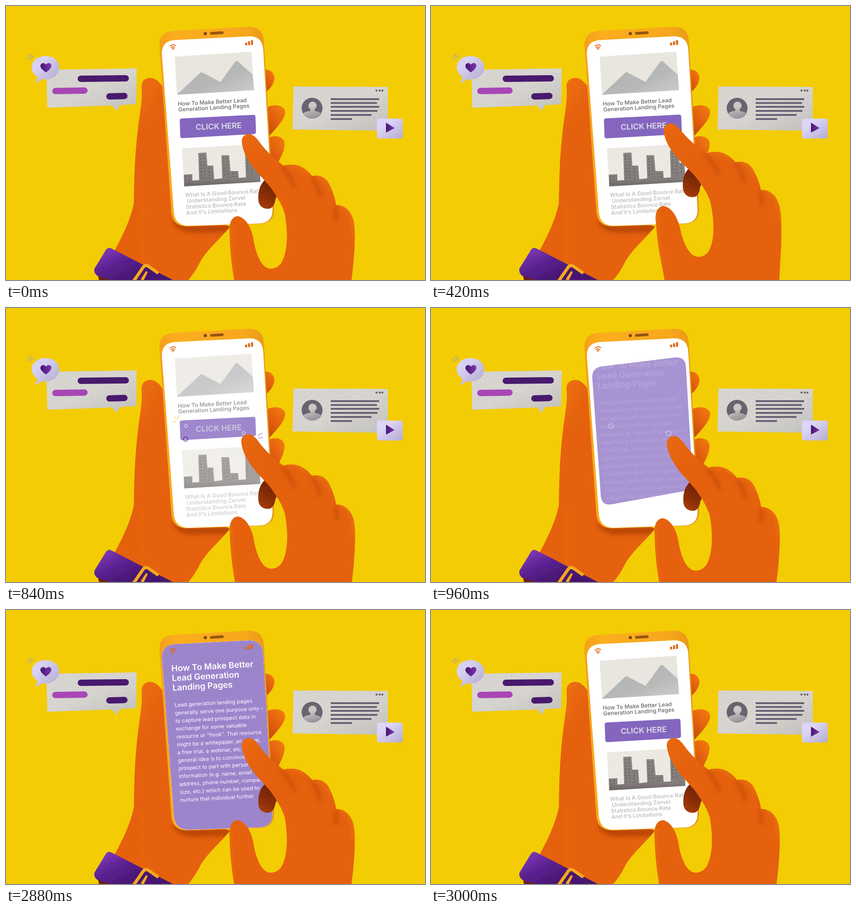
Animation, 924 px wide and 606 px high, one loop 5.37 s. Source, as an HTML page:

```html
<!DOCTYPE html>
<html lang="en">
<head>
<meta charset="utf-8">
<style>
html, body { margin: 0; width: 100%; height: 100%; overflow: hidden; background: #f3cc04; }
svg { display: block; width: 924px; height: 606px; }
text { font-family: Inter, Roboto, sans-serif; font-weight: 600; white-space: pre; }
.bar { fill: none; stroke: #48196d; stroke-width: 14; stroke-linecap: round; }
.ring { fill: none; stroke: #e9e2f8; stroke-width: 1.3; }
</style>
</head>
<body>
<svg viewBox="0 0 924 606">
<defs>
  <linearGradient id="skin" gradientUnits="userSpaceOnUse" x1="290" y1="180" x2="420" y2="260">
    <stop stop-color="#ec6f10"/><stop offset=".4" stop-color="#e5610e"/>
  </linearGradient>
  <linearGradient id="tip" x1="1" y1="0" x2=".3" y2="1">
    <stop stop-color="#f1800f"/><stop offset=".5" stop-color="#e5620e"/><stop offset="1" stop-color="#c34a08"/>
  </linearGradient>
  <linearGradient id="front" gradientUnits="userSpaceOnUse" x1="500" y1="300" x2="770" y2="520">
    <stop stop-color="#ea6a10"/><stop offset=".2" stop-color="#e5610e"/>
  </linearGradient>
  <linearGradient id="curled" x1=".6" y1="0" x2=".2" y2="1">
    <stop stop-color="#6b2004"/><stop offset=".6" stop-color="#8b2f07"/><stop offset="1" stop-color="#a63d09"/>
  </linearGradient>
  <linearGradient id="case" x1="0" y1="0" x2="1" y2="0">
    <stop stop-color="#f3a01b"/><stop offset=".15" stop-color="#fbae1e"/><stop offset=".75" stop-color="#f7a71c"/><stop offset="1" stop-color="#e29319"/>
  </linearGradient>
  <linearGradient id="paper" x1="0" y1="0" x2="1" y2="1">
    <stop offset=".5" stop-color="#dbd9d4"/><stop offset="1" stop-color="#c6c4c0"/>
  </linearGradient>
  <linearGradient id="lilac" x1="0" y1="0" x2="1" y2="1">
    <stop offset=".3" stop-color="#dcd5f8"/><stop offset="1" stop-color="#b3acce"/>
  </linearGradient>
  <linearGradient id="violet" x1="0" y1="0" x2="1" y2="0">
    <stop stop-color="#46166e"/><stop offset="1" stop-color="#7d35b0"/>
  </linearGradient>
  <linearGradient id="person" x1="0" y1="0" x2=".3" y2="1">
    <stop offset=".4" stop-color="#cac7c5"/><stop offset="1" stop-color="#98959a"/>
  </linearGradient>
  <linearGradient id="strap" gradientUnits="userSpaceOnUse" x1="240" y1="535" x2="275" y2="606">
    <stop stop-color="#7a34b3"/><stop offset=".4" stop-color="#5c2094"/><stop offset="1" stop-color="#45126f"/>
  </linearGradient>
  <linearGradient id="rock" x1="0" y1="0" x2="1" y2="1">
    <stop stop-color="#aeb0b1"/><stop offset=".6" stop-color="#b7b9b9"/><stop offset="1" stop-color="#cfcfcc"/>
  </linearGradient>
  <linearGradient id="town" x1="0" y1="0" x2="0" y2="1">
    <stop stop-color="#8b8684"/><stop offset=".8" stop-color="#827d7b"/><stop offset="1" stop-color="#6b6665"/>
  </linearGradient>
  <filter id="grain" x="0" y="0" width="1" height="1">
    <feTurbulence type="fractalNoise" baseFrequency=".85" numOctaves="2" seed="4"/>
    <feColorMatrix values="0 0 0 0 .1  0 0 0 0 .08  0 0 0 0 .1  0 0 0 .9 -.43"/>
    <feComposite in2="SourceGraphic" operator="in" result="dots"/>
    <feMerge><feMergeNode in="SourceGraphic"/><feMergeNode in="dots"/></feMerge>
  </filter>
  <filter id="soft" x="-50%" y="-50%" width="200%" height="200%"><feGaussianBlur stdDeviation="5"/></filter>
  <path id="palm" d="M299 182C297 163 311 156 325 160Q342 167 352 192L420 460L494 488C470 518 440 541 426 570Q416 590 402 606H225L240 540C258 506 274 474 282 436C283 370 284 330 292 262C297 225 301 205 299 182Z"/>
  <path id="hand" d="M520 301C519 289 528 282 538 283Q547 285 556 297C574 322 592 338 612 353Q626 349 641 352C657 356 667 366 675 376C694 372 707 381 714 396C722 413 726 427 728 440C748 440 760 454 765 470Q770 483 769 520Q768 560 762 606L755 680H512L503 606C497 570 494 540 493 500C491 478 500 464 512 465C530 469 540 490 545 512C550 545 561 575 578 580Q594 584 606 570C622 545 622 500 615 460C609 438 595 418 584 402C566 380 551 367 540 350C528 333 522 318 520 301Z"/>
  <clipPath id="palmClip"><use href="#palm"/></clipPath>
  <clipPath id="handClip"><use href="#hand"/></clipPath>
  <clipPath id="screenClip"><path class="screen"/></clipPath>
  <clipPath id="panelClip"><path class="panel"/></clipPath>
</defs>

<rect width="924" height="606" fill="#f3cc04"/>

<!-- chat card -->
<path d="M89 141L288 138L287 217L252 219L243 232L234 220L91 225Z" fill="url(#paper)" filter="url(#grain)"/>
<path class="bar" d="M165 161L264 160M228 200L261 199"/>
<path class="bar" d="M109 188L173 187" style="stroke:#a846b6"/>
<path d="M64 171L70 157C54 147 52 128 66 117C80 107 103 109 113 122C122 135 117 152 102 159Q92 164 80 162Z" fill="url(#lilac)" filter="url(#grain)"/>
<path d="M88 147C80 141 75 136 76 131C78 125 86 125 88 130C91 125 99 125 100 131C100 137 96 141 88 147Z" fill="url(#violet)"/>
<path d="M48 117Q49 108 58 107M53 119Q54 113 62 111" fill="none" stroke="#b5ab8c" stroke-width="2"/>

<!-- profile card -->
<path d="M634 178L842 179L842 276L632 273Z" fill="url(#paper)" filter="url(#grain)"/>
<circle cx="675" cy="226" r="23" fill="#69636f"/>
<path d="M655 238Q660 233 671 232V228A9 9 0 1 1 681 228V232Q692 234 696 238Q689 249 675 249Q662 248 655 238Z" fill="url(#person)"/>
<path d="M716 206H823M716 214.500H818M716 223H823M716 232H819M716 241H806M716 250H763" stroke="#685f73" stroke-width="3.800"/>
<path d="M817 187h.1M824 187h.1M830 187h.1" stroke="#685f73" stroke-width="4.500" stroke-linecap="round"/>
<rect x="818" y="249" width="57" height="44" rx="5" fill="url(#lilac)"/>
<path d="M838 258L857 270L838 280Z" fill="url(#violet)"/>

<!-- holding hand -->
<g fill="url(#tip)">
  <path d="M565 141C582 138 592 147 592 160C591 173 583 182 570 194Z"/>
  <path d="M570 227C585 217 607 216 615 230C618 243 609 257 578 290Z"/>
  <path d="M575 294C590 284 610 287 614 301C616 316 608 330 601 345L590 365Z"/>
</g>
<use href="#palm" fill="url(#skin)"/>
<g clip-path="url(#palmClip)" filter="url(#soft)" fill="none">
  <path d="M374 474Q385 492 408 493L500 492" stroke="#a83c07" stroke-width="16" opacity=".7"/>
  <path d="M300 440L298 610" stroke="#ee7210" stroke-width="10" opacity=".3"/>
</g>
<path d="M203 596L230 606H205Z" fill="#6d1f10"/>
<path d="M195 581L220 540Q225 532 234 537L300 571L368 606H230L204 598Q193 593 195 581Z" fill="url(#strap)" filter="url(#grain)"/>
<path d="M281 609L303 577Q307 572 313 575L336 591M300 606L312 588" fill="none" stroke="#f7a81d" stroke-width="7"/>
<path d="M304 606L313 588L338 600L344 606Z" fill="#481373"/>

<!-- phone -->
<path id="body" fill="url(#case)"/>
<circle cx="439.500" cy="61" r="3.600" fill="#81460f"/>
<path d="M453 60.500L477 59" stroke="#965510" stroke-width="6" stroke-linecap="round"/>
<path class="screen" fill="#fff"/>

<g id="home">
  <path d="M372 112L541 101L547 186L377 197Z" fill="#e9e6df"/>
  <path d="M377 196L428 148Q431 145 435 148L473 168L505 124Q508 120 512 123L544 152L547 186Z" fill="url(#rock)"/>
  <g font-size="12.400" fill="#7b777c">
    <text transform="translate(379 221) rotate(-3.200)">How To Make Better Lead</text>
    <text transform="translate(380 233.500) rotate(-3.200)">Generation Landing Pages</text>
  </g>
  <path id="button" fill="#8466bf"/>
  <path d="M388 315L557 305L561 389L393 399Z" fill="#ece9e2"/>
  <path d="M393 399L392 373L411 372V386L426 385L424 325L442 324L444 353L457 353L459 383L477 381L475 330L492 330L495 365L512 365L513 380L529 379L527 319L545 318L548 347L559 346L561 389Z" fill="url(#town)"/>
  <path id="windows" stroke="#615c5c" stroke-width="2" stroke-dasharray="3 4"/>
  <g font-size="12.300" fill="#c2c1c2">
    <text transform="translate(395 422.500) rotate(-3.200)">What Is A Good Bounce Rate</text>
    <text transform="translate(399 435.500) rotate(-3.200)">Understanding Zorvel</text>
    <text transform="translate(397 449) rotate(-3.200)">Statistics Bounce Rate</text>
    <text transform="translate(397.500 462) rotate(-3.200)">And It’s Limitations</text>
  </g>
</g>

<g clip-path="url(#screenClip)"><path class="panel" id="panel" fill="#8466bf"/></g>
<text id="label" transform="translate(418.500 274) rotate(-2.300)" font-size="17.300" fill="#dfdfe6">CLICK HERE</text>
<g clip-path="url(#panelClip)"><g id="article" fill="#fff"></g></g>

<g fill="none" stroke="#dd6a18" stroke-width="2">
  <path d="M361 89Q368 83 375 88M363.500 92.500Q368 88.500 373 92"/>
  <path d="M366 95.500Q368 93.500 371 95.300" stroke-width="2.500"/>
  <path d="M529.500 87V81M536 86.500V78M542.500 86V75.500" stroke-width="4.500"/>
</g>

<g id="sparks" fill="none" stroke-width="3.200" stroke-linecap="round">
  <path d="M371 240l4 5M382 238l-3 6M368 252l7-1" stroke="#f7e7a4"/>
  <path d="M556 282l8-5M557 287h8M550 289l4 4" stroke="#c9bce6"/>
</g>
<circle class="ring" cx="397" cy="261"/>
<circle class="ring" cx="524" cy="277"/>
<circle id="dark" class="ring" cx="396" cy="290" style="stroke:#4b1a80"/>

<!-- tapping hand -->
<g id="tap">
  <path d="M572 384C558 396 555 415 557 433C560 445 570 450 582 448Q592 444 594 428L602 410Z" fill="url(#curled)"/>
  <use href="#hand" fill="url(#front)"/>
  <g clip-path="url(#handClip)"><g filter="url(#soft)" fill="none" stroke-width="7">
    <path d="M609 356Q628 376 637 402M674 379Q688 395 693 422M727 443Q729 456 727 474" stroke="#b54206" opacity=".6"/>
    <path d="M620 349Q652 352 666 368M682 374Q709 378 718 410M738 440Q769 452 768 510" stroke="#f38512" opacity=".5"/>
    <path d="M500 600Q489 520 495 480" stroke="#f38512" opacity=".5"/>
  </g></g>
</g>
</svg>
<script>
const LOOP = 5370;
const $ = id => document.getElementById(id);
const setAll = (sel, attr, v) => document.querySelectorAll(sel).forEach(e => e.setAttribute(attr, v));
const clamp = v => Math.min(1, Math.max(0, v));
const span = (t, a, b) => clamp((t - a) / (b - a));
const mix = (a, b, p) => a + (b - a) * p;
const ease = u => u < .5 ? 2 * u * u : 1 - 2 * (1 - u) ** 2;

// Piecewise linear value through [time, value] pairs
function keys(t, ...pairs) {
  let v = pairs[0][1];
  for (let i = 1; i < pairs.length; i++)
    if (t >= pairs[i - 1][0])
      v = mix(pairs[i - 1][1], pairs[i][1], span(t, pairs[i - 1][0], pairs[i][0]));
  return v;
}

// Closed polygon with rounded corners
function rounded(pts, r) {
  const toward = (p, q) => {
    const k = r / Math.hypot(q[0] - p[0], q[1] - p[1]);
    return [mix(p[0], q[0], k), mix(p[1], q[1], k)];
  };
  const n = pts.length;
  return pts.map((p, i) =>
    `${i ? 'L' : 'M'}${toward(p, pts[(i + n - 1) % n])}Q${p} ${toward(p, pts[(i + 1) % n])}`).join('') + 'Z';
}

const BUTTON = [[383, 249], [550, 240.5], [551.5, 283], [384.5, 292.5]];
const SCREEN = [[341.5, 77], [565.5, 65.5], [589.5, 480], [372.5, 487]];
const BODY = [[336, 57], [566.5, 44], [593, 481], [367, 488.5]];
const SKEW = [4, -14, -24, 12];

$('body').setAttribute('d', rounded(BODY, 34));
setAll('.screen', 'd', rounded(SCREEN, 32));
$('button').setAttribute('d', rounded(BUTTON, 5));
$('windows').setAttribute('d', [[396, 376, 392], [403, 376, 392], [429, 330, 382], [436, 329, 382], [448, 358, 382],
  [480, 336, 378], [487, 335, 378], [500, 369, 378], [506, 369, 378], [532, 325, 374], [540, 324, 374], [552, 350, 372]]
  .map(([x, top, end]) => `M${x} ${top}L${x + (end - top) * .04} ${end}`).join(''));

function addLines(lines, x, y, gap, size, weight) {
  lines.forEach((line, i) => {
    const el = document.createElementNS('http://www.w3.org/2000/svg', 'text');
    el.textContent = line;
    el.setAttribute('transform', `translate(${x + i * gap * .06} ${y + i * gap}) rotate(-3.2)`);
    el.setAttribute('style', `font-size:${size}px;font-weight:${weight}`);
    $('article').append(el);
  });
}
addLines(['How To Make Better', 'Lead Generation', 'Landing Pages'], 365, 136, 21.3, 18.7, 600);
addLines(['Lead generation landing pages', 'generally serve one purpose only –', 'to capture lead prospect data in',
  'exchange for some valuable', 'resource or “hook”. That resource', 'might be a whitepaper, an eBook,',
  'a free trial, a webinar, etc. The', 'general idea is to convince the', 'prospect to part with personal',
  'information (e.g. name, email', 'address, phone number, company', 'size, etc.) which can be used to',
  'nurture that individual further'], 372, 214.5, 17.5, 11.75, 400);

function panelPath(t) {
  const p = Math.sin(span(t, 850, 1075) * Math.PI / 2);
  const s = keys(t, [390, 1], [420, 1.02], [540, 1.1], [690, 1]);
  const bend = Math.sin(p * Math.PI);
  const pts = BUTTON.map(([x, y], i) => [
    mix(467 + (x - 467) * s, SCREEN[i][0], p),
    mix(266.5 + (y - 266.5) * s, SCREEN[i][1], p) + SKEW[i] * bend
  ]);
  return rounded(pts, mix(5, 32, p));
}

function draw(t) {
  const back = span(t, 2850, 3000);
  const home = back ? back * back : 1 - span(t, 800, 950);
  const raise = ease(span(t, 0, 480)) - ease(span(t, 540, 960));

  $('tap').setAttribute('transform', `rotate(${-2.9 * raise} 54 430)`);
  setAll('.panel', 'd', panelPath(t));
  $('panel').setAttribute('opacity', back ? 1 - back : keys(t, [780, 1], [840, .78], [930, .67], [960, .7], [1080, 1]));
  $('home').setAttribute('opacity', home);
  $('label').setAttribute('opacity', home);
  $('button').setAttribute('opacity', back ? 1 : 0);
  $('article').setAttribute('opacity', back ? 1 - back ** 3 : keys(t, [900, 0], [960, .16], [1140, 1]));

  const out = keys(t, [660, .9], [840, 1], [930, 1.03]);
  $('sparks').setAttribute('transform', `translate(467 266) scale(${out}) translate(-467 -266)`);
  $('sparks').setAttribute('opacity', keys(t, [660, 0], [720, 1], [840, .9], [930, 0]));
  setAll('.ring', 'r', keys(t, [720, 0], [840, 3.5], [960, 5.3], [1050, 7]));
  setAll('.ring', 'opacity', keys(t, [720, 0], [760, 1], [960, .7], [1050, 0]));
  $('dark').setAttribute('r', keys(t, [690, 0], [840, 4.8], [930, 7]));
  $('dark').setAttribute('opacity', keys(t, [690, 0], [720, 1], [840, 1], [930, 0]));
}

function tick() {
  draw(performance.now() % LOOP);
  requestAnimationFrame(tick);
}
tick();
</script>
</body>
</html>
```
